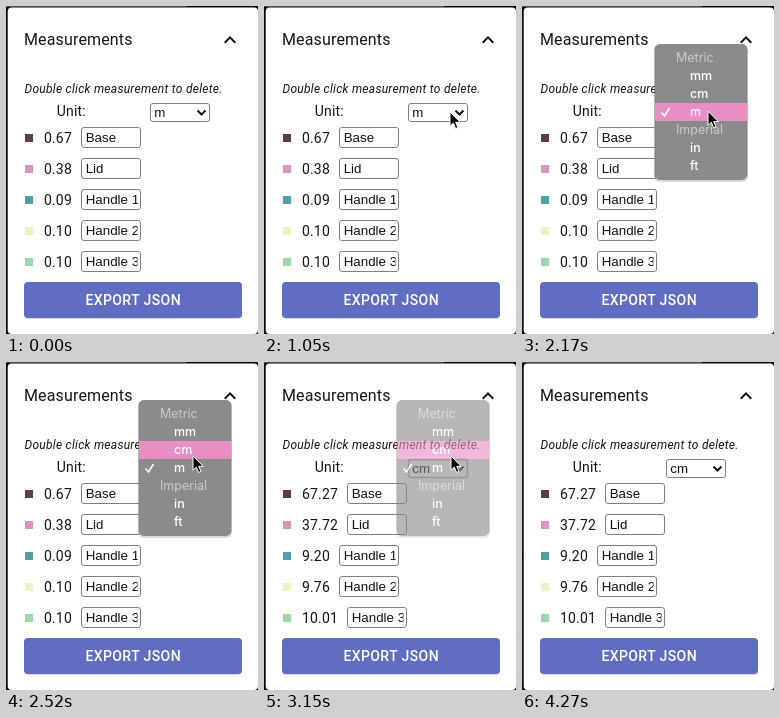
Animation of 252x328 px, one loop 4480 ms. Source, as an HTML page:

```html
<!DOCTYPE html>
<html lang="en">
<head>
<meta charset="utf-8">
<title>Measurements</title>
<style>
  html, body { margin: 0; width: 100%; height: 100%; overflow: hidden; background: #000; }
  svg { display: block; width: 100vw; height: 100vh; }
  svg svg { width: auto; height: auto; }
  text { white-space: pre; }
  .ui { font-family: Roboto, sans-serif; fill: #151515; }
  .field { font-family: "Liberation Sans", Arial, sans-serif; font-size: 13.333px; fill: #111; }
  .menu { font-family: Inter, sans-serif; font-size: 12.5px; font-weight: 500; fill: #fff; }
  .box { fill: #fff; stroke: #808080; }
</style>
</head>
<body>
<svg id="stage" viewBox="0 0 252 328" preserveAspectRatio="none"></svg>
<script>
const LOOP = 4480, STEP = 70;
const OPEN = 1190, PICK = 2940, CHANGE = 3150, CLOSE = 3290, BLUR = 4270;
const PINK = '#e78fc5';
const stage = document.getElementById('stage');

function add(parent, tag, attrs, text) {
  const el = document.createElementNS('http://www.w3.org/2000/svg', tag);
  for (const key in attrs) el.setAttribute(key, attrs[key]);
  if (text !== undefined) el.textContent = text;
  parent.appendChild(el);
  return el;
}
const set = (el, key, value) => el.setAttribute(key, value);
const show = (el, on) => set(el, 'visibility', on ? 'visible' : 'hidden');
const label = (parent, cls, x, y, text, style = '') =>
  add(parent, 'text', { class: cls, x, y, style }, text);

// Panel and heading
add(stage, 'rect', { width: 252, height: 328, fill: '#080808' });
add(stage, 'rect', { width: 180, height: 1, fill: '#4e4b42' });
add(stage, 'rect', { x: 1.7, y: 1.5, width: 250.3, height: 326.5, rx: 4, fill: '#fff' });
label(stage, 'ui', 18, 39, 'Measurements', 'font-size:16px;letter-spacing:.15px');
add(stage, 'path', {
  d: 'M12 8l-6 6 1.41 1.41L12 10.83l4.59 4.58L18 14z',
  transform: 'translate(212 22)', fill: '#111'
});
label(stage, 'ui', 18.5, 87, 'Double click measurement to delete.',
  'font-size:12px;font-style:italic;letter-spacing:.27px');
label(stage, 'ui', 50.8, 110, 'Unit:', 'font-size:14px;letter-spacing:.15px');

// Unit select
const selectBox = add(stage, 'rect', {
  class: 'box', x: 144.5, y: 97.5, width: 59, height: 18, rx: 2.5
});
const unit = label(stage, 'field', 148.3, 111, 'm');
add(stage, 'path', {
  d: 'M191.5 104.5l4 4 4-4', fill: 'none', stroke: '#111', 'stroke-width': 2
});

// Measurement rows
const rows = [
  ['#613b50', '0.67', '67.27', 'Base'],
  ['#da96c1', '0.38', '37.72', 'Lid'],
  ['#509fa9', '0.09', '9.20', 'Handle 1'],
  ['#f0f2c4', '0.10', '9.76', 'Handle 2'],
  ['#a0d9a8', '0.10', '10.01', 'Handle 3']
].map(([color, m, cm, name], i) => {
  const y = 132 + 31 * i;
  add(stage, 'rect', { x: 19, y: y - 4, width: 8, height: 8, fill: color });
  const value = label(stage, 'ui', 38, y + 5, m, 'font-size:14px;letter-spacing:.15px');
  const input = add(stage, 'g', {});
  add(input, 'rect', { class: 'box', x: .5, y: y - 10.5, width: 59, height: 20, rx: 2.5 });
  const view = add(input, 'svg', {
    x: 3, y: y - 9, width: 53.5, height: 18, style: 'width:53.5px;height:18px'
  });
  label(view, 'field', 1.7, 13, name);
  return { value, input, m, cm };
});

// Export button
add(stage, 'rect', { x: 18, y: 278, width: 218, height: 35, rx: 4, fill: '#000', opacity: .13 });
add(stage, 'rect', { x: 18, y: 276, width: 218, height: 36, rx: 4, fill: '#5f6ec0' });
label(stage, 'ui', 127.2, 299.3, 'EXPORT JSON',
  'font-size:14px;font-weight:500;letter-spacing:.4px;text-anchor:middle;fill:#fff');

// Unit menu
const menu = add(stage, 'g', {});
add(menu, 'rect', { x: 132, y: 38, width: 94, height: 138, rx: 6, fill: '#000', opacity: .15 });
add(menu, 'rect', {
  x: 133, y: 38.5, width: 92, height: 135, rx: 5, fill: '#8b8b8b', stroke: '#7c7c7c', 'stroke-width': .7
});
const hover = add(menu, 'rect', { x: 133, y: 97, width: 92, height: 18, fill: PINK });
['Metric', 'mm', 'cm', 'm', 'Imperial', 'in', 'ft'].forEach((text, i) => {
  const head = i % 4 === 0;
  label(menu, 'menu', head ? 154 : 168, 56 + 18 * i, text,
    head ? 'fill:#c9c9c9;font-weight:400' : '');
});
add(menu, 'path', {
  d: 'M139.5 106.5l3 3.5 5-8', fill: 'none', stroke: '#fff', 'stroke-width': 1.5
});

// Pointer
const pointer = add(stage, 'path', {
  d: 'M0 0V14.2L3.3 11.1 5.6 16.5 8 15.5 5.7 10.3H10.2Z',
  fill: '#000', stroke: '#fff', 'stroke-width': 1, 'stroke-linejoin': 'round'
});
const path = [
  [420, 231, 274], [560, 230, 195], [700, 217, 95], [840, 198, 50],
  [910, 188, 75], [980, 187, 96], [1050, 186, 106],
  [2380, 186, 105], [2450, 187, 99], [2520, 187, 94],
  [3500, 187, 94], [3570, 172, 100], [3640, 130, 112], [3710, 89, 124], [3780, 89, 124]
];

function pointerAt(t) {
  const i = path.findIndex(p => p[0] > t);
  if (i < 1) return null;
  const [t0, x0, y0] = path[i - 1], [t1, x1, y1] = path[i];
  const k = (t - t0) / (t1 - t0);
  return [x0 + (x1 - x0) * k, y0 + (y1 - y0) * k];
}

function draw(time) {
  const t = Math.floor((time % LOOP) / STEP) * STEP;

  const cm = t >= CHANGE;
  const focus = t >= OPEN && t < BLUR;
  unit.textContent = cm ? 'cm' : 'm';
  set(selectBox, 'style', focus ? 'stroke:#d795bd;stroke-width:1.6' : '');
  for (const row of rows) {
    const value = cm ? row.cm : row.m;
    row.value.textContent = value;
    set(row.input, 'transform', `translate(${value.length > 4 ? 83 : 75} 0)`);
  }

  const at = pointerAt(t);
  show(pointer, at);
  if (at) set(pointer, 'transform', `translate(${at})`);

  // The chosen item blinks once before the menu fades
  show(menu, t >= OPEN && t < CLOSE);
  set(menu, 'opacity', t < 3080 ? 1 : Math.max(0, .95 - (t - 3080) / 210));
  set(hover, 'y', t >= 2450 ? 79 : 97);
  set(hover, 'opacity', t === PICK ? 0 : 1);
}

const start = performance.now();
function tick() {
  draw(performance.now() - start);
  requestAnimationFrame(tick);
}
tick();
</script>
</body>
</html>
```
